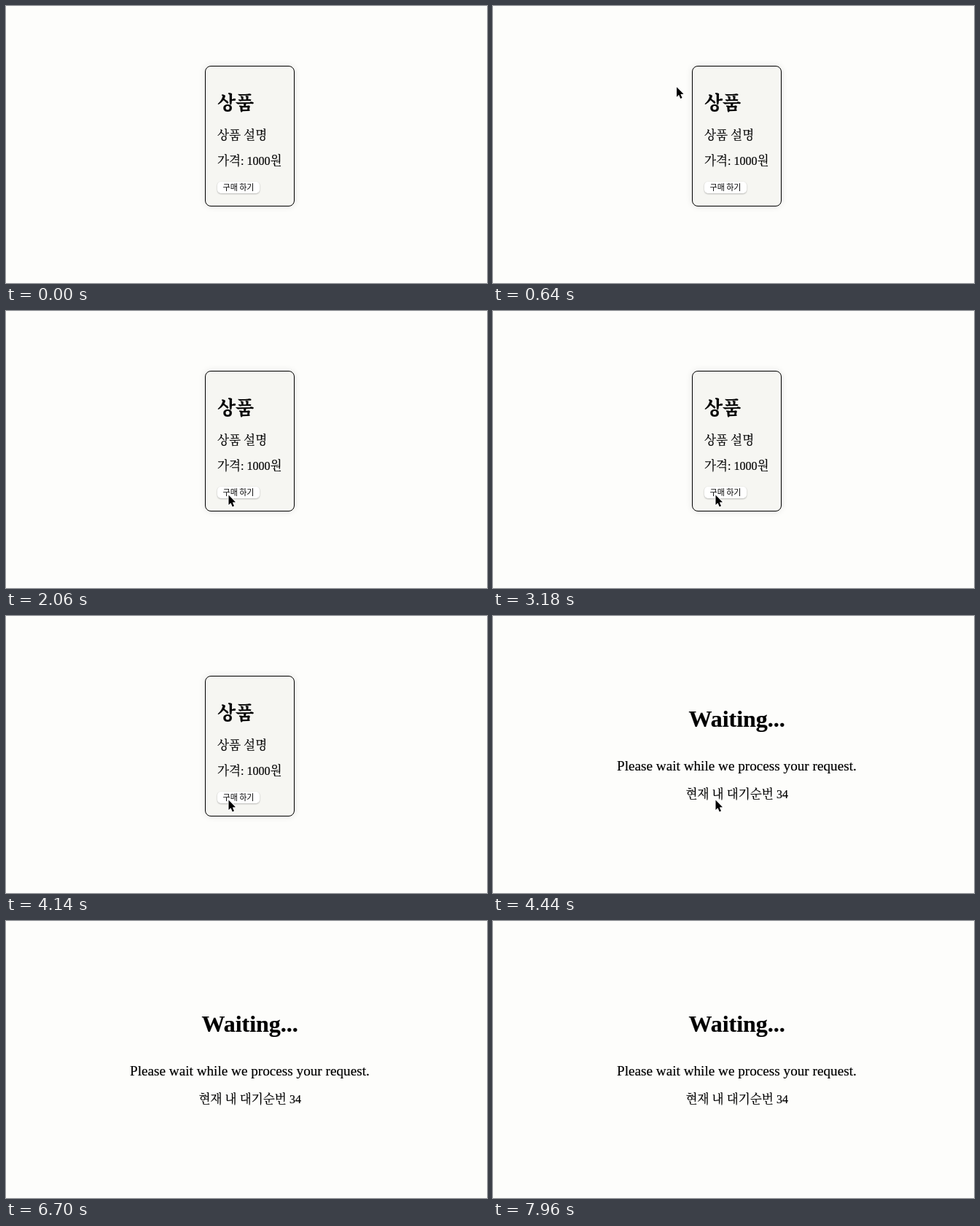
An HTML page with a canvas for the animation above (8 s loop, 660 by 380 pixels).

```html
<!DOCTYPE html>
<html lang="ko">
<head>
<meta charset="utf-8">
<title>Waiting</title>
<style>
  html, body { margin: 0; width: 100%; height: 100%; overflow: hidden; background: #fdfdfb; }
  canvas { display: block; width: 660px; height: 380px; }
</style>
</head>
<body>
<canvas id="stage"></canvas>
<script>
const W = 660, H = 380, LOOP = 8000, PAGE_AT = 4280;
const LATIN = '"Liberation Serif", serif';
const HANGUL = '"Noto Serif CJK KR", "Noto Sans CJK KR", "Noto Sans CJK", sans-serif';
const HANGUL_SCALE = 1.04; // brings a syllable's advance up to a full em

const canvas = document.getElementById('stage');
const ctx = canvas.getContext('2d');
const dpr = window.devicePixelRatio || 1;
canvas.width = W * dpr;
canvas.height = H * dpr;

// Cursor strokes with rests between them: time, x, y of the hot spot
const path = [
  [240, -14, 45], [860, 358, 137], [920, 358, 137], [1225, 292, 271],
  [1300, 292, 271], [1660, 305, 252], [6150, 305, 252], [6500, 20, 150]
];

const smooth = u => u * u * (3 - 2 * u);

function cursorAt(t) {
  for (let i = 1; i < path.length; i++) {
    const [t0, x0, y0] = path[i - 1], [t1, x1, y1] = path[i];
    if (t >= t0 && t < t1) {
      const k = smooth((t - t0) / (t1 - t0));
      return { x: x0 + (x1 - x0) * k, y: y0 + (y1 - y0) * k };
    }
  }
  return null;
}

// Mixed Korean and Latin text, drawn run by run and slightly emboldened
function write(text, x, y, size, bold = false) {
  ctx.fillStyle = ctx.strokeStyle = '#000';
  ctx.lineWidth = 0.2;
  ctx.textAlign = 'left';
  for (const run of text.match(/[가-힣]+|[^가-힣]+/g)) {
    const korean = /[가-힣]/.test(run);
    ctx.font = korean
      ? `${bold ? 900 : 400} ${size * HANGUL_SCALE}px ${HANGUL}`
      : `${bold ? 700 : 400} ${size}px ${LATIN}`;
    ctx.fillText(run, x, y);
    ctx.strokeText(run, x, y);
    x += ctx.measureText(run).width;
  }
}

function box(x, y, w, h, r) {
  ctx.beginPath();
  ctx.roundRect(x, y, w, h, r);
}

function shadow(color, blur, dy = 0) {
  ctx.shadowColor = color;
  ctx.shadowBlur = blur * dpr;
  ctx.shadowOffsetY = dy * dpr;
}

function drawProduct() {
  ctx.save();
  shadow('rgba(0,0,0,.1)', 10);
  ctx.fillStyle = '#f6f6f2';
  box(273, 82, 123, 193, 8);
  ctx.fill();
  ctx.restore();
  ctx.strokeStyle = '#000';
  ctx.lineWidth = 1;
  box(273.5, 82.5, 122, 192, 7.5);
  ctx.stroke();

  write('상품', 290, 142, 25, true);
  write('상품 설명', 290, 183, 16);
  write('가격: 1000원', 290, 218, 16);

  ctx.save();
  shadow('rgba(0,0,0,.3)', 2, 0.7);
  ctx.fillStyle = '#fff';
  box(290, 241, 58, 16, 5);
  ctx.fill();
  ctx.restore();
  ctx.fillStyle = '#000';
  ctx.textAlign = 'center';
  ctx.font = '11px "Noto Sans CJK KR", "Noto Sans CJK", sans-serif';
  ctx.fillText('구매 하기', 319, 253);
}

function drawWaiting() {
  write('Waiting...', 268.4, 152, 32, true);
  write('Please wait while we process your request.', 170, 212, 19.2);
  write('현재 내 대기순번 34', 264.5, 250, 16);
}

function outlined(width) {
  ctx.lineJoin = 'round';
  ctx.strokeStyle = '#fff';
  ctx.lineWidth = width;
  ctx.stroke();
}

function drawArrow(x, y) {
  ctx.save();
  ctx.translate(x, y);
  const tip = [[0.5, 0.5], [0.5, 14], [3.5, 11.2], [5.7, 16.4], [8, 15.4], [5.8, 10.4], [10, 10.2]];
  ctx.beginPath();
  tip.forEach(([px, py]) => ctx.lineTo(px, py));
  ctx.closePath();
  outlined(2);
  ctx.fillStyle = '#000';
  ctx.fill();
  ctx.restore();
}

function drawBeam(x, y) {
  ctx.save();
  ctx.translate(Math.round(x) + 0.5, Math.round(y));
  ctx.beginPath();
  ctx.moveTo(-3, -7.5);
  ctx.quadraticCurveTo(0, -7.5, 0, -5);
  ctx.quadraticCurveTo(0, -7.5, 3, -7.5);
  ctx.moveTo(0, -5);
  ctx.lineTo(0, 5);
  ctx.moveTo(-3, 7.5);
  ctx.quadraticCurveTo(0, 7.5, 0, 5);
  ctx.quadraticCurveTo(0, 7.5, 3, 7.5);
  ctx.moveTo(-2, 2.5);
  ctx.lineTo(2, 2.5);
  outlined(2.4);
  ctx.strokeStyle = '#000';
  ctx.lineWidth = 1;
  ctx.stroke();
  ctx.restore();
}

const overText = ({ x, y }) => x > 288 && x < 380 && y > 115 && y < 232;

function draw(t) {
  ctx.setTransform(dpr, 0, 0, dpr, 0, 0);
  ctx.fillStyle = '#fdfdfb';
  ctx.fillRect(0, 0, W, H);
  if (t < PAGE_AT) drawProduct();
  else drawWaiting();
  const c = cursorAt(t);
  if (!c) return;
  if (t < PAGE_AT && overText(c)) drawBeam(c.x, c.y);
  else drawArrow(c.x, c.y);
}

const start = performance.now();
function tick() {
  draw((performance.now() - start) % LOOP);
  requestAnimationFrame(tick);
}
tick();
</script>
</body>
</html>
```
